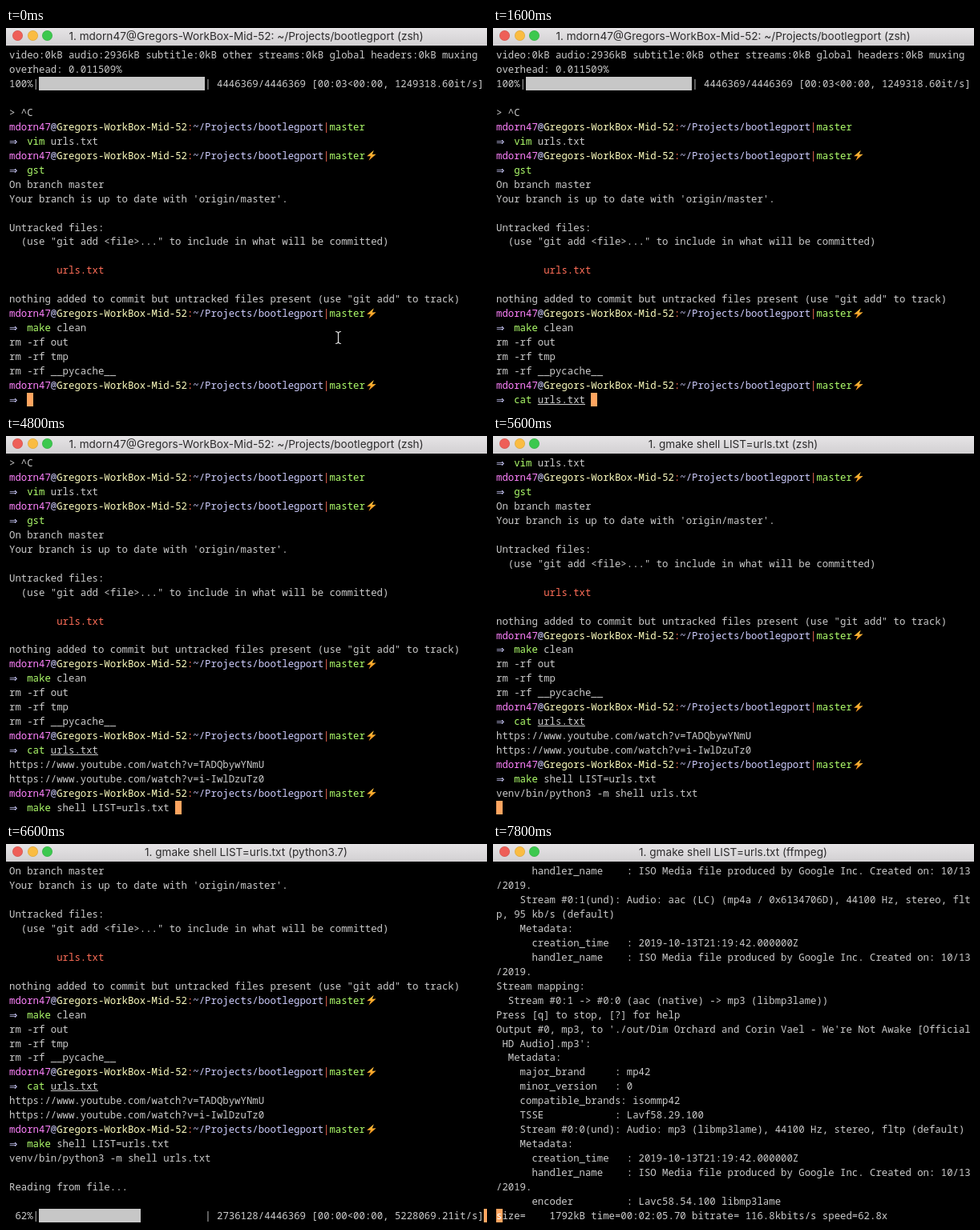
These frames come from a looping animation (600x475 px, 8000 ms). An HTML page:

```html
<!DOCTYPE html>
<html lang="en">
<head>
<meta charset="utf-8">
<title>Terminal</title>
<style>
html, body { margin: 0; width: 100%; height: 100%; overflow: hidden; background: #000; }
#stage { position: relative; width: 600px; height: 475px; overflow: hidden; background: #000; }
#bar {
  position: absolute; left: 0; top: 0; width: 600px; height: 22px;
  background: linear-gradient(#e6e4e6, #d2d0d2);
}
#bar i {
  position: absolute; top: 3px; width: 13px; height: 13px; border-radius: 50%;
  box-shadow: inset 0 0 0 .7px rgba(0, 0, 0, .12);
}
#title {
  position: absolute; left: 0; top: 0; width: 599px; text-align: center; white-space: pre;
  font: 13.6px/20px Inter, Roboto, sans-serif; color: #2c2b2c;
}
#rows { position: absolute; left: 4px; top: 25px; }
#rows div {
  position: absolute; left: 0; height: 18px; white-space: pre; color: #cbcbcb;
  font: 12.333px/18px "Noto Sans Mono", "DejaVu Sans Mono", monospace; font-variant-ligatures: none;
}
#caret { position: absolute; top: 456px; width: 8px; height: 17px; background: #ffa560; }
#mouse { position: absolute; left: 409px; top: 378px; }
.user, .host, .path, .arrow, .green { font-weight: 500; }
.user { color: #ff82fd; }
.host { color: #ffffc0; }
.path, .arrow { color: #cfceff; }
.red { color: #ff6e58; }
.green { color: #b0ff6c; }
.white { color: #fff; }
.file { text-decoration: underline; }
.arrow { display: inline-block; width: 7.4px; height: 18px; vertical-align: top; font-family: "DejaVu Sans", sans-serif; }
.bolt {
  display: inline-block; width: 12px; height: 13px; margin: 2px 0 0 2px; vertical-align: top;
  background: linear-gradient(#ffc640, #f58f1a);
  clip-path: polygon(75% 0, 2% 58%, 42% 57%, 22% 100%, 98% 38%, 58% 40%);
}
.fill { display: inline-block; height: 17px; vertical-align: top; background: #c7c7c7; }
</style>
</head>
<body>
<div id="stage">
  <div id="bar">
    <i style="left:7.5px;background:#ee5f58"></i>
    <i style="left:26.5px;background:#fabc42"></i>
    <i style="left:45px;background:#3cc84e"></i>
    <div id="title"></div>
  </div>
  <div id="caret"></div>
  <div id="rows"></div>
  <svg id="mouse" width="11" height="18" fill="none" stroke-linecap="round">
    <path id="beam" d="M2.5 1.5Q5 1.5 5.5 3.5Q6 1.5 8.5 1.5M5.5 3.5V14.5M2.5 16.5Q5 16.5 5.5 14.5Q6 16.5 8.5 16.5" stroke="#e4e4e4" stroke-width="1.2"/>
  </svg>
</div>
<script>
const LOOP = 8000, COLS = 80, ROWS = 25, CELL = 7.4, PITCH = 17.96;
const USER = 'mdorn47', HOST = 'Gregors-WorkBox-Mid-52', DIR = '~/Projects/bootlegport';
const $ = id => document.getElementById(id);

// A line is a list of [class, text, width in cells] parts.
const plain = text => (text.match(/.{1,80}/g) || ['']).map(s => [['', s]]);
const text = block => block.split('\n').flatMap(plain);

const prompt = dirty => [
  ['user', USER], ['path', '@'], ['host', HOST], ['red', ':'], ['path', DIR],
  ['red', '|'], ['green', 'master'], ...(dirty ? [['bolt', '']] : [])
];

function command(input) {
  const [, word, gap, rest] = input.match(/^(\S*)(\s*)(.*)$/);
  const known = ['vim', 'gst', 'make', 'cat'].includes(word);
  const file = word === 'cat' && rest.startsWith('urls.txt');
  return [
    ['arrow', '⇒'], ['', '  '], [known ? 'green' : 'red', word], ['', gap],
    ...(file ? [['file', 'urls.txt'], ['', rest.slice(8)]] : [['', rest]])
  ];
}

function progress(done, time, rate) {
  const total = 4446369, part = done / total, size = 28;
  const fill = Math.floor(part * size * 8) / 8;
  const percent = String(Math.round(part * 100)).padStart(3);
  return [
    ['', percent + '%|'], ['fill', '', fill], ['gap', '', size - fill],
    ['', `| ${done}/${total} [${time}<00:00, ${rate}it/s]`]
  ];
}

function encoding(kb, time, rate, speed) {
  const size = String(kb).padStart(8);
  return [['white', 's'], ['', `ize=${size}kB time=${time} bitrate= ${rate}kbits/s speed=${speed}x`]];
}

const start = [
  ...text('video:0kB audio:2936kB subtitle:0kB other streams:0kB global headers:0kB muxing overhead: 0.011509%'),
  progress(4446369, '00:03', '1249318.60'),
  ...text('\n> ^C'),
  prompt(false), command('vim urls.txt'),
  prompt(true), command('gst'),
  ...text(`On branch master
Your branch is up to date with 'origin/master'.

Untracked files:
  (use "git add <file>..." to include in what will be committed)
`),
  [['', ' '.repeat(8)], ['red', 'urls.txt']],
  ...text('\nnothing added to commit but untracked files present (use "git add" to track)'),
  prompt(true), command('make clean'),
  ...text('rm -rf out\nrm -rf tmp\nrm -rf __pycache__'),
  prompt(true)
];

const listed = [
  ...start, command('cat urls.txt'),
  ...text('https://www.youtube.com/watch?v=TADQbywYNmU\nhttps://www.youtube.com/watch?v=i-IwlDzuTz0')
];
const ready = [...listed, prompt(true)];
const launched = [...ready, command('make shell LIST=urls.txt'), ...text('venv/bin/python3 -m shell urls.txt')];
const reading = [...launched, ...text('\nReading from file...')];
const waiting = [...reading, ...text('')];

const stamp = `    Metadata:
      creation_time   : 2019-10-13T21:19:42.000000Z
      handler_name    : ISO Media file produced by Google Inc. Created on: 10/13/2019.`;
const header = text(`      handler_name    : ISO Media file produced by Google Inc. Created on: 10/13/2019.
    Stream #0:1(und): Audio: aac (LC) (mp4a / 0x6134706D), 44100 Hz, stereo, fltp, 95 kb/s (default)
${stamp}
Stream mapping:
  Stream #0:1 -> #0:0 (aac (native) -> mp3 (libmp3lame))
Press [q] to stop, [?] for help
Output #0, mp3, to './out/Dim Orchard and Corin Vael - We're Not Awake [Official HD Audio].mp3':
  Metadata:
    major_brand     : mp42
    minor_version   : 0
    compatible_brands: isommp42
    TSSE            : Lavf58.29.100
    Stream #0:0(und): Audio: mp3 (libmp3lame), 44100 Hz, stereo, fltp (default)
${stamp}
      encoder         : Lavc58.54.100 libmp3lame`);

const shell = `1. ${USER}@${HOST}: ${DIR} (zsh)`;
const job = name => `1. gmake shell LIST=urls.txt (${name})`;
const blank = [['', '']];
const typed = (log, list) => list.map(([at, input]) => [at, shell, log, command(input)]);

// [time, window title, lines above, bottom line]
const steps = [
  ...typed(start, [
    [0, ''], [600, 'c'], [800, 'ca'], [1000, 'cat'], [1200, 'cat u'], [1400, 'cat urls.txt ']
  ]),
  [2400, shell, listed, blank],
  ...typed(ready, [
    [2600, ''], [3400, 'ma'], [3600, 'make'], [3800, 'make s'], [4000, 'make shel'],
    [4200, 'make shell L'], [4400, 'make shell LIST'], [4600, 'make shell LIST=u'],
    [4800, 'make shell LIST=urls.txt ']
  ]),
  [5600, job('zsh'), launched, blank],
  [5800, job('python3.7'), launched, blank],
  [6000, job('python3.7'), reading, blank],
  [6200, job('python3.7'), waiting, blank],
  [6600, job('python3.7'), waiting, progress(2736128, '00:00', '5228069.21')],
  [6800, job('python3.7'), waiting, progress(3784704, '00:00', '5231846.37')],
  [7000, job('python3.7'), waiting, progress(4446369, '00:00', '5232617.40')],
  [7200, job('ffmpeg'), header, blank],
  [7400, job('ffmpeg'), header, encoding(768, '00:00:59.92', '105.0', '59.9')],
  [7600, job('ffmpeg'), header, encoding(1280, '00:01:31.40', '114.7', '60.9')],
  [7800, job('ffmpeg'), header, encoding(1792, '00:02:05.70', '116.8', '62.8')]
];

function span([cls, str, cells]) {
  const el = document.createElement('span');
  el.className = cls;
  el.textContent = str;
  if (cells !== undefined) {
    el.style.display = 'inline-block';
    el.style.width = cells * CELL + 'px';
  }
  return el;
}

function row(line, i) {
  const el = document.createElement('div');
  el.style.top = i * PITCH + 'px';
  el.append(...line.map(span));
  return el;
}

function show([at, title, log, last]) {
  const lines = [...log, last].slice(-ROWS);
  const rewound = last[0][0] === 'white';
  const col = rewound ? 0 : last.reduce((n, [, s, cells]) => n + (cells ?? s.length), 0);
  $('title').textContent = title;
  $('rows').replaceChildren(...lines.map(row));
  $('caret').style.left = Math.round(4 + Math.min(col, COLS) * CELL) + 'px';
  $('mouse').style.display = at < 600 ? '' : 'none';
}

const begin = performance.now();
let current;
function tick() {
  const t = (performance.now() - begin) % LOOP;
  const step = steps.findLast(s => s[0] <= t);
  if (step !== current) show(current = step);
  requestAnimationFrame(tick);
}
tick();
</script>
</body>
</html>
```
